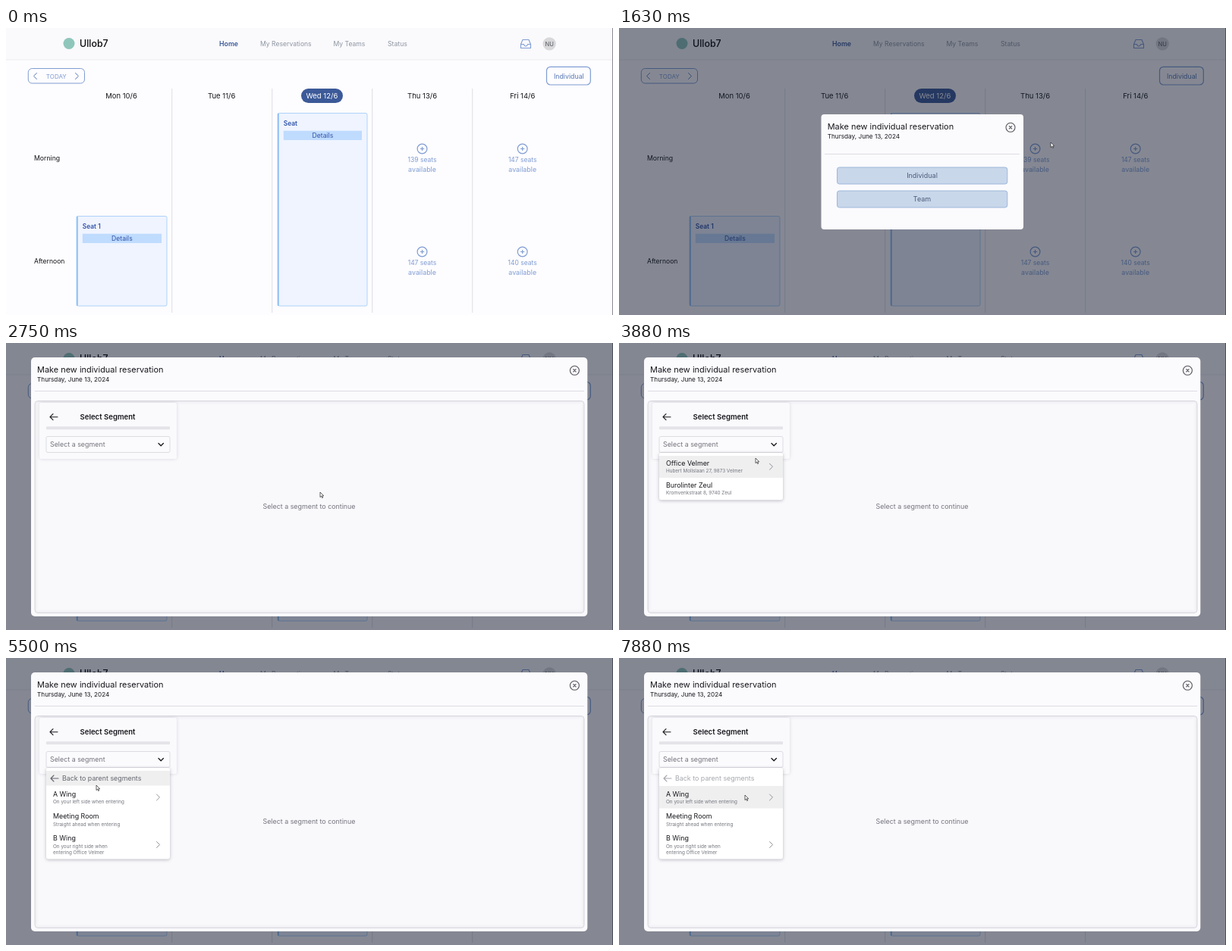
These frames come from a looping animation (800 by 379 pixels, 8 s). An HTML page:

```html
<!DOCTYPE html>
<html lang="en">
<head>
<meta charset="utf-8">
<title>Seat reservation</title>
<style>
html, body { margin: 0; width: 100%; height: 100%; overflow: hidden; background: #fdfcfe; }
svg { display: block; width: 100vw; height: 100vh; font-family: Inter, "Open Sans", sans-serif; }
.raised { filter: drop-shadow(0 1px 2px rgba(20, 24, 40, .28)); }
.soft { filter: drop-shadow(0 0 2px rgba(20, 24, 40, .14)); }
</style>
</head>
<body>
<svg id="stage" viewBox="0 0 800 379" preserveAspectRatio="none"></svg>
<script>
const LOOP = 8000, STEP = 125;
const NAVY = '#3c5a99', SKY = '#7f9dd3', INK = '#17181c', GREY = '#73757d';

const text = (x, y, size, str, fill = INK, more = '') =>
  `<text x="${x}" y="${y}" font-size="${size}" fill="${fill}" ${more}>${str}</text>`;
const mid = (x, y, size, str, fill, more = '') =>
  text(x, y, size, str, fill, 'text-anchor="middle" ' + more);
const box = (x, y, x2, y2, fill, more = '') =>
  `<rect x="${x}" y="${y}" width="${x2 - x}" height="${y2 - y}" fill="${fill}" ${more}/>`;
const line = (d, stroke, width = 1) =>
  `<path d="${d}" fill="none" stroke="${stroke}" stroke-width="${width}" stroke-linecap="round" stroke-linejoin="round"/>`;
const group = (id, body, more = '') => `<g id="${id}" ${more}>${body}</g>`;
const SEMI = 'font-weight="600"', MEDIUM = 'font-weight="500"';

const chevron = (x, y, stroke = '#85878d') => line(`M${x - 2} ${y - 4}l4 4l-4 4`, stroke, .9);
const backArrow = (x, y, stroke) => line(`M${x + 10} ${y}H${x}m4-4l-4 4l4 4`, stroke, 1.1);
const closeIcon = (x, y) =>
  `<circle cx="${x}" cy="${y}" r="6" fill="none" stroke="#55575e" stroke-width="1.1"/>` +
  line(`M${x - 1.7} ${y - 1.7}l3.4 3.4m0-3.4l-3.4 3.4`, '#55575e', 1.1);

function header() {
  return box(0, 0, 800, 41.5, '#faf9fc') + box(0, 41.5, 800, 42.5, '#ececf2') +
    '<circle cx="83" cy="20.5" r="7.5" fill="#8fc6bb"/>' +
    text(97, 25, 12.4, 'Ullob7', '#0b0b0d', MEDIUM) +
    text(281, 24, 8.8, 'Home', NAVY, SEMI) +
    text(335, 24, 8.6, 'My Reservations', '#8d96a1') +
    text(431.5, 24, 8.6, 'My Teams', '#8d96a1') +
    text(503, 24, 8.7, 'Status', '#8d96a1') +
    line('M678.5 21.5L681 15.5H689L691.5 21.5V26.5H678.5ZM678.5 21.5H682.5Q683 24 685 24T687.5 21.5H691.5', SKY, 1.1) +
    '<circle cx="716.2" cy="20.8" r="8.6" fill="#d8d8db"/>' +
    mid(716.2, 23.6, 7.6, 'NU', '#55575c');
}

function toolbar() {
  return box(29.3, 53.5, 103.5, 73, 'none', `rx="5" stroke="${SKY}"`) +
    line('M40.5 59.5l-4 4l4 4M91.5 59.5l4 4l-4 4', '#5f7fb8') +
    mid(66.3, 66.5, 8, 'TODAY', SKY) +
    box(712.5, 51.3, 770.3, 75, 'none', `rx="5" stroke="${SKY}" stroke-width="1.2"`) +
    mid(741.8, 66.5, 8.8, 'Individual', '#5878b4');
}

function days() {
  const names = ['Mon 10/6', 'Tue 11/6', 'Wed 12/6', 'Thu 13/6', 'Fri 14/6'];
  let out = box(389, 80, 444, 99, NAVY, 'rx="9.5"');
  names.forEach((name, i) => {
    out += mid(152 + 132.2 * i, 93, 9.5, name, i === 2 ? '#fff' : INK);
    if (i) out += box(86.3 + 132 * i, 80, 87.2 + 132 * i, 376, '#dadbe2');
  });
  return out + text(37, 175, 8.7, 'Morning') + text(37, 311, 8.6, 'Afternoon');
}

function card(x, y, x2, title) {
  return box(x, y, x2, 367, '#eff4ff', 'rx="2" stroke="#add2f8"') +
    box(x - .5, y, x + 1.5, 367, '#8fc0f5', 'rx="1"') +
    text(x + 7.5, y + 16, 8.4, title, '#2f52a8', SEMI) +
    box(x + 7.5, y + 23.2, x2 - 7, y + 35.5, '#bfdbfe') +
    mid((x + x2 + .5) / 2, y + 32.7, 8.6, 'Details', '#2f52a8');
}

function slot(x, y, count, id = 'slot') {
  return `<g class="${id}" fill="${SKY}" stroke="none">` +
    `<circle class="ring" cx="${x}" cy="${y}" r="6.4" fill="none" stroke="${SKY}" stroke-width="1.2"/>` +
    `<path class="plus" d="M${x - 2.6} ${y}h5.2m-2.6-2.6v5.2" stroke="${SKY}" stroke-width="1.2"/>` +
    mid(x, y + 17.7, 8.5, count + ' seats', 'inherit') +
    mid(x, y + 30.2, 8.9, 'available', 'inherit') + '</g>';
}

function heading(x, y) {
  return text(x, y, 10.95, 'Make new individual reservation') +
    text(x, y + 12.7, 8.2, 'Thursday, June 13, 2024');
}

function smallDialog() {
  const skin = 'rx="3" stroke="#9db7db"';
  return box(266.5, 114, 533, 266, '#fbfafd', 'rx="4"') + heading(274.7, 133.5) + closeIcon(516, 131.3) +
    box(271, 166, 528, 167, '#dddde3') +
    box(287.5, 184, 511.8, 206, '#c9d7ea', skin + ' id="choice"') +
    box(287.5, 215, 511.8, 237, '#c9d7ea', skin) +
    mid(399.5, 198, 9, 'Individual', '#4a5b78') + mid(399.5, 229, 9, 'Team', '#4a5b78');
}

function bigDialog() {
  let inset = '';
  for (let i = 1; i < 5; i++)
    inset += box(38 + i, 76.5 + i, 762 - i, 356.5 - i, 'none', `rx="3" stroke="#202434" stroke-opacity="${.05 / i}"`);
  return box(33, 19, 766.3, 361, '#fbfafd', 'rx="5"') + heading(41, 38.5) + closeIcon(749.4, 36.3) +
    box(38, 63, 762, 64, '#dddde3') +
    box(38, 76.5, 762, 356.5, '#f9f8fb', 'rx="4" stroke="#d9d9df"') + inset +
    mid(399.5, 219, 8.9, 'Select a segment to continue', GREY) +
    box(44, 79, 225, 153, '#faf9fc', 'rx="2" class="soft"') +
    backArrow(58, 97.7, INK) + mid(134, 101.2, 9.6, 'Select Segment', INK, SEMI) +
    box(53, 110.3, 216, 114.3, '#e4e3e7', 'rx="1"') +
    box(53, 123.5, 216, 144.5, '#fbfafc', 'rx="2" stroke="#dcdce2"') +
    text(58, 137, 8.9, 'Select a segment', GREY) + line('M201 132.5l3.2 3.2l3.2-3.2', INK, 1.3);
}

function item(y, name, notes, arrowY) {
  return text(62, y, 8.9, name) +
    notes.map((n, i) => text(62, y + 9.3 + 8.8 * i, 6.35, n, GREY)).join('') +
    (arrowY ? chevron(200.5, arrowY) : '');
}

const offices = () => box(53, 145, 216, 207.3, '#fff', 'rx="3" class="raised"') +
  box(53, 149, 216, 178, '#efeff0') +
  item(162, 'Office Velmer', ['Hubert Mollslaan 27, 9873 Velmer'], 163.3) +
  item(191, 'Burolinter Zeul', ['Kromvenkstraat 8, 9740 Zeul']);

const wings = () => box(53, 145, 216, 265.5, '#fff', 'rx="3" class="raised"') +
  group('onBack', box(53, 149, 216, 168.5, '#efeff0')) +
  group('onWing', box(53, 169, 216, 198.5, '#efeff0')) +
  group('back', backArrow(59, 159, 'inherit') + text(74, 162.2, 8.9, 'Back to parent segments', 'inherit', 'stroke="none"')) +
  item(183, 'A Wing', ['On your left side when entering'], 184) +
  item(212.3, 'Meeting Room', ['Straight ahead when entering']) +
  item(241.3, 'B Wing', ['On your right side when', 'entering Office Velmer'], 246.5);

const skin = 'fill="#fff" stroke="#222" stroke-width=".7" stroke-linejoin="round"';
document.getElementById('stage').innerHTML =
  box(0, 0, 800, 379, '#fdfcfe') + header() + toolbar() + days() +
  card(93.3, 248.5, 212, 'Seat 1') + card(358.3, 112.5, 476, 'Seat') +
  box(489, 112.5, 607.5, 231.5, '#f3f3f6', 'id="glow"') +
  slot(548.5, 159.5, 139, 'target') + slot(680.7, 159.5, 147) +
  slot(548.5, 295.5, 147) + slot(680.7, 295.5, 140) +
  box(799, 0, 800, 379, '#8b8b92') +
  box(0, 0, 800, 379, 'rgba(15,23,42,.5)', 'id="dim"') +
  group('small', smallDialog()) + group('big', bigDialog()) +
  group('offices', offices()) + group('wings', wings()) +
  group('cursor',
    `<path id="arrow" ${skin} d="M0 0V6.6L1.6 5.2L2.7 7.6L3.7 7.1L2.6 4.8H4.7Z"/>` +
    `<path id="hand" ${skin} d="M-.8 .7Q0 -.4 .8 .7V4l3 .8q1 .5 .8 1.8L4 9.5H-.5L-3 6q.2-1 1.2-.6l1 .8Z"/>`);

const $ = id => document.getElementById(id);
const show = (id, on) => $(id).setAttribute('display', on ? 'inline' : 'none');
const ramp = (t, a, b) => Math.min(1, Math.max(0, (t - a) / (b - a)));
const ease = u => u * u * (3 - 2 * u);
const mix = (a, b, u) => a + (b - a) * u;
const blend = (a, b, u) => `rgb(${a.map((v, i) => Math.round(mix(v, b[i], u)))})`;

// Pointer stops: time, x, y
const path = [
  [1625, 569, 151], [2375, 414, 197], [3125, 414, 197], [3625, 180, 136], [3750, 180, 136],
  [3875, 180, 152], [4500, 180, 152], [5250, 119, 168], [6000, 119, 168],
  [6625, 150, 184], [7625, 160, 182], [7875, 166, 181]
];

function pointer(t) {
  let i = 0;
  while (i < path.length - 2 && t >= path[i + 1][0]) i++;
  const [a, x, y] = path[i], [b, x2, y2] = path[i + 1], u = ease(ramp(t, a, b));
  return [mix(x, x2, u), mix(y, y2, u)];
}

function draw(ms) {
  const t = Math.floor((ms % LOOP + 5) / STEP) * STEP;
  const modal = t >= 1625, big = t >= 2750, deep = t >= 4500;
  const [x, y] = pointer(t);

  const hover = modal ? 0 : ramp(t, 250, 750), grow = modal ? 0 : ramp(t, 250, 1125);
  const tint = blend([127, 157, 211], [68, 100, 176], hover);
  const target = document.querySelector('.target');
  target.setAttribute('fill', tint);
  target.querySelector('.ring').setAttribute('r', mix(6.4, 7, grow));
  for (const part of target.querySelectorAll('.ring, .plus')) {
    part.setAttribute('stroke', tint);
    part.setAttribute('stroke-width', mix(1.2, 1.5, grow));
  }
  $('glow').setAttribute('opacity', hover);

  show('dim', modal);
  show('small', modal && !big);
  show('big', big);
  show('offices', t >= 3750 && !deep);
  show('wings', deep);

  const onChoice = modal && !big && x > 287 && x < 512 && y > 184 && y < 206;
  $('choice').setAttribute('fill', onChoice ? '#a0b8da' : '#c9d7ea');

  const onBack = y < 168.7;
  show('onBack', onBack);
  show('onWing', !onBack);
  const shade = onBack ? '#64666c' : '#a6a8ae';
  $('back').setAttribute('fill', shade);
  $('back').setAttribute('stroke', shade);

  show('cursor', modal);
  show('hand', onChoice);
  show('arrow', !onChoice);
  $('cursor').setAttribute('transform', `translate(${x} ${y})`);
}

const start = performance.now();
function tick() {
  draw(performance.now() - start);
  requestAnimationFrame(tick);
}
tick();
</script>
</body>
</html>
```
